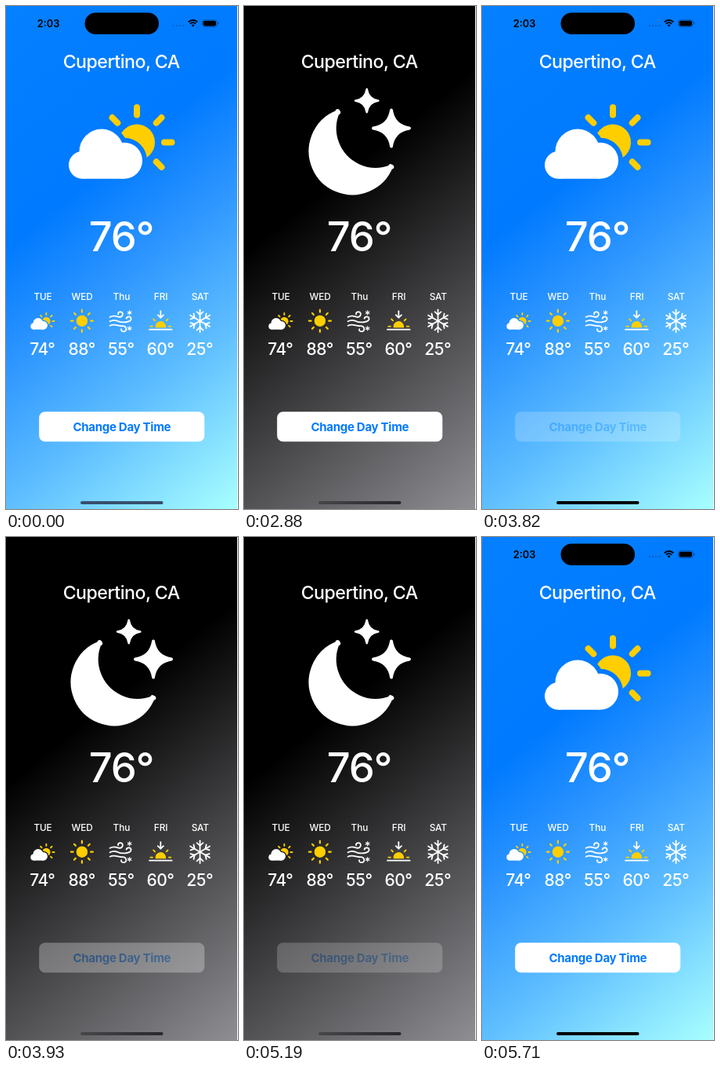
Write an HTML page with a canvas that moves like this. It is 296x640 px and loops after 5.76 s.

```html
<!DOCTYPE html>
<html lang="en">
<head>
<meta charset="utf-8">
<title>Weather</title>
<style>
html, body { margin: 0; width: 100%; height: 100%; overflow: hidden; background: #fff; }
canvas, svg { position: absolute; left: 0; top: 0; width: 296px; height: 640px; }
text { font-family: Inter, Roboto, sans-serif; font-weight: 500; fill: #fff; text-anchor: middle; }
.city { font-size: 23.2px; letter-spacing: -0.52px; }
.now { font-size: 52.5px; letter-spacing: -1.2px; }
.day { font-size: 11.8px; letter-spacing: -0.1px; }
.temp { font-size: 21px; letter-spacing: -0.5px; }
.clock { font-size: 12.8px; font-weight: 600; fill: #000; }
.label { font-size: 15px; font-weight: 700; fill: #007aff; letter-spacing: -0.28px; }
</style>
</head>
<body>
<canvas id="stage" width="296" height="640"></canvas>
<svg id="words" viewBox="0 0 296 640">
  <text class="clock" x="54" y="26.7">2:03</text>
  <text class="city" x="147.2" y="79">Cupertino, CA</text>
  <text class="now" x="147" y="311.6">76°</text>
  <g id="button">
    <rect x="42.2" y="516.2" width="211" height="38" rx="7.5" fill="#fff"/>
    <text class="label" x="147.8" y="540.6">Change Day Time</text>
  </g>
</svg>
<script>
const W = 295, H = 640, LOOP = 5760, TAU = Math.PI * 2;
const WHITE = '#fff', SUN = '#ffce00';
const ctx = document.getElementById('stage').getContext('2d');
const words = document.getElementById('words');
const button = document.getElementById('button');

// start, end and number of redraws of each tap on the button
const TAPS = [[2440, 2880, 4], [3030, 3440, 4], [3820, 4360, 5], [5190, 5710, 5]];
const WEEK = [['TUE', 74], ['WED', 88], ['Thu', 55], ['FRI', 60], ['SAT', 25]];
const columnX = i => 47 + i * 50.2;

function addText(cls, x, y, str) {
  const el = document.createElementNS('http://www.w3.org/2000/svg', 'text');
  el.setAttribute('class', cls);
  el.setAttribute('x', x);
  el.setAttribute('y', y);
  el.textContent = str;
  words.appendChild(el);
}
WEEK.forEach(([day, deg], i) => {
  addText('day', columnX(i), 373.8, day);
  addText('temp', columnX(i) - 0.6, 444, deg + '°');
});

function gradient(x1, y1, x2, y2, stops) {
  const g = ctx.createLinearGradient(x1, y1, x2, y2);
  stops.forEach(([at, color]) => g.addColorStop(at, color));
  return g;
}
// Lines of equal colour rise to the right
function sky(stops) {
  const slope = 0.8, k = (slope * W + H) / (slope * slope + 1);
  return gradient(0, 0, slope * k, k, stops);
}
const DAY_SKY = sky([[0, '#0580ff'], [0.35, '#007aff'], [0.5, '#2791ff'], [0.73, '#5fbeff'], [1, '#a8ffff']]);
const NIGHT_SKY = sky([[0, '#000'], [0.36, '#000'], [1, '#8e8e93']]);
const NIGHT_BAR = gradient(95, 0, 200, 0, [[0, '#464648'], [1, '#28282e']]);

function disc(x, y, r, color) {
  ctx.fillStyle = color;
  ctx.beginPath();
  ctx.arc(x, y, r, 0, TAU);
  ctx.fill();
}
function pill(x, y, w, h, r, color) {
  ctx.fillStyle = color;
  ctx.beginPath();
  ctx.roundRect(x, y, w, h, r);
  ctx.fill();
}
function pen(color, width) {
  ctx.strokeStyle = color;
  ctx.lineWidth = width;
  ctx.lineCap = ctx.lineJoin = 'round';
}
function line(x1, y1, x2, y2) {
  ctx.beginPath();
  ctx.moveTo(x1, y1);
  ctx.lineTo(x2, y2);
  ctx.stroke();
}
function rays(x, y, from, to, angles) {
  for (const a of angles) {
    const c = Math.cos(a * TAU / 8), s = Math.sin(a * TAU / 8);
    line(x + c * from, y + s * from, x + c * to, y + s * to);
  }
}
function at(x, y, scale, draw) {
  ctx.save();
  ctx.translate(x, y);
  ctx.scale(scale, scale);
  draw();
  ctx.restore();
}

const PUFFS = [[-26, 12.8, 28.5], [3, 24.5, 23], [-50.5, 30, 17.5]];

function cloudSun() {
  ctx.save();
  for (const [x, y, r] of PUFFS) {
    ctx.beginPath();
    ctx.rect(-200, -200, 400, 400);
    ctx.arc(x, y, r + 6, 0, TAU);
    ctx.clip('evenodd');
  }
  disc(19, 1.2, 23, SUN);
  ctx.restore();
  pen(SUN, 8);
  rays(19, 1.2, 35, 44.5, [-3, -2, -1, 0, 1]);
  for (const [x, y, r] of PUFFS) disc(x, y, r, WHITE);
  ctx.fillRect(-50.5, 25, 53.5, 22.5);
}

function sunny() {
  disc(0, 0, 7.2, SUN);
  pen(SUN, 2.2);
  rays(0, 0, 11.3, 14, [0, 1, 2, 3, 4, 5, 6, 7]);
}

const GUSTS = new Path2D(
  'M-14.5-5Q-10-7.5-5-5.5C2-3 4-11-1-11.5C-3.5-11.5-4.5-10-4-8.5' +
  'M-14.5.5Q-10-2-5 0C1 3 12 2 12.5-2.5C12.5-6 7-6.5 6.5-3' +
  'M-14.5 6C-8 3-4 7 1 6.5C7 6 8 13.5 3 13.5C.5 13.5-.5 12 0 10.5');

function windSnow() {
  pen(WHITE, 1.8);
  ctx.stroke(GUSTS);
  pen(WHITE, 1.1);
  for (const y of [-10.5, 9.5])
    for (let i = 0; i < 3; i++) {
      const a = TAU / 4 + i * TAU / 6, c = 2.6 * Math.cos(a), s = 2.6 * Math.sin(a);
      line(10.5 - c, y - s, 10.5 + c, y + s);
    }
}

function sunset() {
  ctx.fillStyle = SUN;
  ctx.beginPath();
  ctx.arc(0, 7.2, 6.8, Math.PI * 0.94, Math.PI * 2.06);
  ctx.fill();
  pen(SUN, 1.9);
  rays(0, 6.9, 10.4, 13, [-4, -3, -1, 0]);
  pen(WHITE, 1.8);
  line(-14.3, 11, 14.3, 11);
  line(0, -12.5, 0, -4.5);
  line(-3.6, -7.6, 0, -4.2);
  line(3.6, -7.6, 0, -4.2);
}

function snowflake() {
  pen(WHITE, 1.8);
  for (let i = 0; i < 6; i++) {
    ctx.save();
    ctx.rotate(i * TAU / 6);
    line(0, 0, 0, -14.4);
    line(-4, -11.6, 0, -8);
    line(4, -11.6, 0, -8);
    ctx.restore();
  }
}

function sparkle(x, y, r, width) {
  const c = r * 0.13;
  ctx.beginPath();
  ctx.moveTo(x, y - r);
  ctx.quadraticCurveTo(x + c, y - c, x + r, y);
  ctx.quadraticCurveTo(x + c, y + c, x, y + r);
  ctx.quadraticCurveTo(x - c, y + c, x - r, y);
  ctx.quadraticCurveTo(x - c, y - c, x, y - r);
  pen(WHITE, width);
  ctx.fillStyle = WHITE;
  ctx.fill();
  ctx.stroke();
}

function moonStars() {
  const top = [119.8, 134.3], right = [188.3, 204.7];
  const arc = (x, y, r, a, b, back) => ctx.arc(x, y, r,
    Math.atan2(a[1] - y, a[0] - x), Math.atan2(b[1] - y, b[0] - x), back);
  ctx.beginPath();
  arc(138.2, 184.7, 52.6, right, top, false);
  arc(167.8, 155.8, 53, top, right, true);
  ctx.closePath();
  pen(WHITE, 6);
  ctx.fillStyle = WHITE;
  ctx.fill();
  ctx.stroke();
  sparkle(188, 155.5, 23.1, 3.8);
  sparkle(156.7, 120.5, 14.6, 2.6);
}

function statusBar() {
  pill(100.5, 8.5, 94.5, 27.5, 13.75, '#000');
  for (let i = 0; i < 4; i++) disc(213.5 + i * 4.2, 25, 1, 'rgba(0,0,0,.28)');
  ctx.strokeStyle = '#000';
  ctx.lineCap = 'butt';
  ctx.lineWidth = 1.9;
  for (const r of [8.3, 5.2]) {
    ctx.beginPath();
    ctx.arc(238.5, 26.3, r, -Math.PI * 0.75, -Math.PI * 0.25);
    ctx.stroke();
  }
  ctx.fillStyle = '#000';
  ctx.beginPath();
  ctx.moveTo(238.5, 26.6);
  ctx.arc(238.5, 26.3, 2.7, -Math.PI * 0.75, -Math.PI * 0.25);
  ctx.fill();
  ctx.strokeStyle = 'rgba(0,0,0,.35)';
  ctx.lineWidth = 0.8;
  ctx.beginPath();
  ctx.roundRect(250.4, 17.6, 18.8, 9, 2.8);
  ctx.stroke();
  pill(251.6, 18.8, 16.4, 6.6, 1.8, '#000');
  pill(270.2, 20.6, 1.2, 3, 0.6, 'rgba(0,0,0,.4)');
}

function stateAt(t) {
  let flips = 0, alpha = 1;
  for (const [start, end, steps] of TAPS) {
    if (t < start) break;
    const k = Math.min(1, Math.floor((t - start) / (end - start) * steps) / steps);
    if (k > 0) flips++;
    alpha = 0.2 + 0.8 * k * k * (3 - 2 * k);
  }
  return { night: flips % 2 === 1, flips, alpha };
}

const ICONS = [
  () => at(0, 0, 0.23, cloudSun), sunny, windSnow, sunset, snowflake
];

function render(t) {
  const { night, flips, alpha } = stateAt(t);
  ctx.fillStyle = night ? NIGHT_SKY : DAY_SKY;
  ctx.fillRect(0, 0, W, H);
  statusBar();
  if (night) moonStars();
  else at(148, 172.3, 1, cloudSun);
  ICONS.forEach((icon, i) => at(columnX(i) - (i ? 0.3 : 0), 400.7, 1, icon));
  pill(95, 630, 105.5, 4, 2, night ? NIGHT_BAR : flips ? '#000' : '#38506c');
  button.setAttribute('opacity', alpha);
}

const began = performance.now();
function tick() {
  render((performance.now() - began) % LOOP);
  requestAnimationFrame(tick);
}
tick();
</script>
</body>
</html>
```
